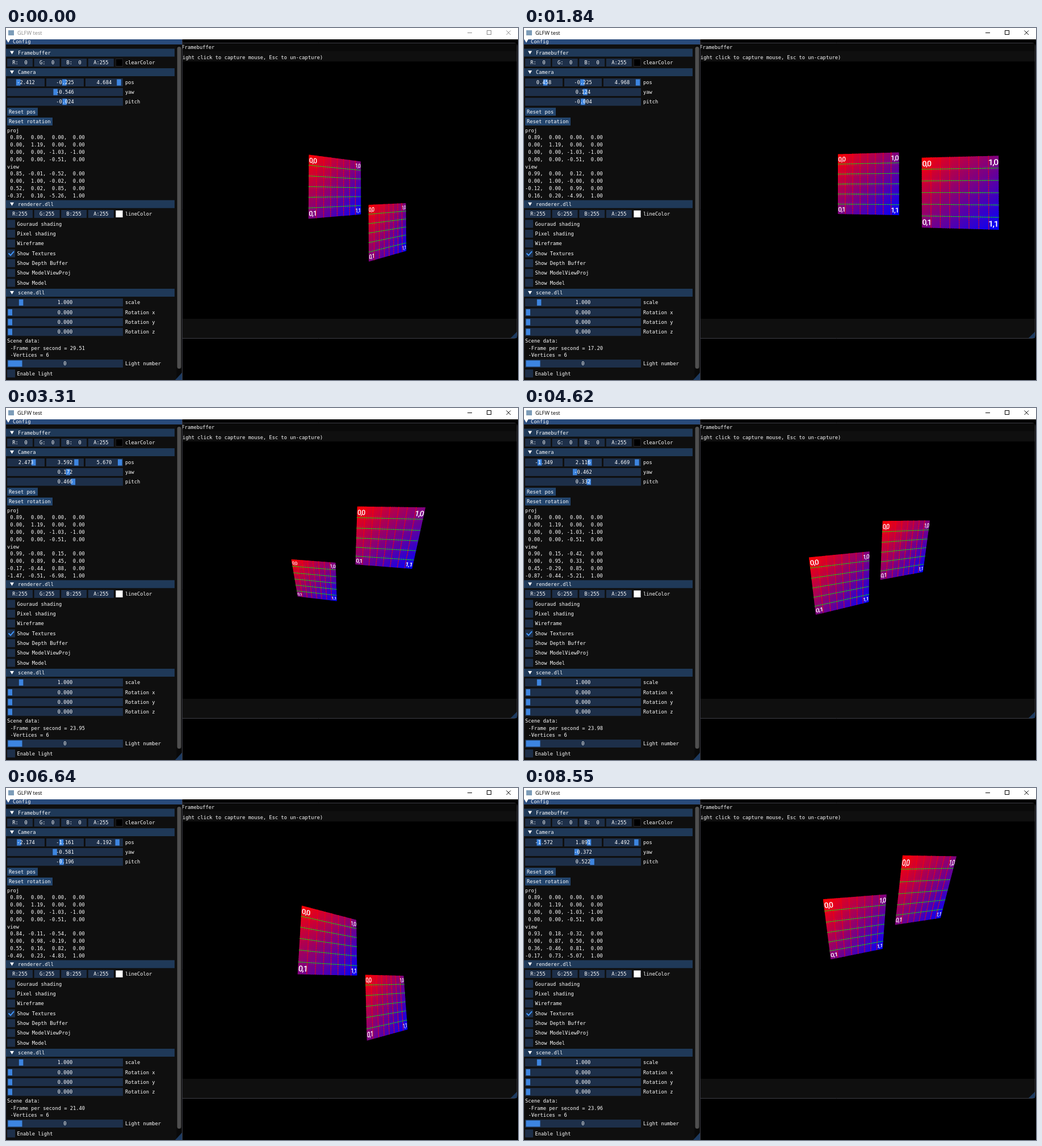
Animation, 902 px wide and 621 px high, one loop 8630 ms. Source, as an HTML page with a canvas:

```html
<!DOCTYPE html>
<html>
<head>
<meta charset="utf-8">
<style>
html, body { margin: 0; width: 100%; height: 100%; overflow: hidden; background: #000; }
canvas { display: block; }
</style>
</head>
<body>
<canvas id="stage" width="902" height="621"></canvas>
<script>
const ctx = document.getElementById('stage').getContext('2d');
const LOOP = 8630, STEPS = 112, STEP = LOOP / STEPS;
const MONO = '8.74px "DejaVu Sans Mono", monospace';
const C = {
  win: '#0f0f0f', frame: '#1d2f49', header: '#1f3958', button: '#23456d',
  grab: '#3d85e0', title: '#294a7a', border: '#3e3e46'
};

// Camera and second quad, keyed by step number.
const KEYS = [0, 24, 43, 60, 75, 97, 108, 111];
const tracks = {
  x: [-2.412, .458, 2.473, -1.349, -2.174, -2.174, -2.1, -1.572],
  y: [-.225, -.225, 3.592, 2.116, -1.387, -.632, .9, 1.891],
  z: [4.684, 4.968, 5.67, 4.669, 4.192, 4.192, 4.25, 4.492],
  yaw: [-.546, .124, .172, -.462, -.574, -.584, -.58, -.372],
  pitch: [-.024, -.0044, .466, .332, -.298, 0, .25, .522],
  lag: [.017, -.004, .012, .036, .026, -.004, -.004, -.005],
  fps: [29.51, 17.2, 23.95, 23.98, 23.45, 19.68, 22.4, 23.96],
  quadX: [2.05, 2.59, 2.89, 2.28, 2.17, 2.18, 2.22, 2.23],
  quadY: [.09, -.43, .04, .05, -.24, -.07, .05, .08],
  quadZ: [.39, .43, .51, .33, .2, .26, .32, .32]
};

// Monotone cubic through the keys.
function sample(v, i) {
  const slope = k => (v[k + 1] - v[k]) / (KEYS[k + 1] - KEYS[k]);
  const tangent = k => {
    if (k === 0 || k === KEYS.length - 1) return slope(k ? k - 1 : 0);
    const a = slope(k - 1), b = slope(k);
    return a * b > 0 ? 2 * a * b / (a + b) : 0;
  };
  let k = 0;
  while (k < KEYS.length - 2 && i >= KEYS[k + 1]) k++;
  const h = KEYS[k + 1] - KEYS[k], s = (i - KEYS[k]) / h, r = 1 - s;
  return v[k] * (1 + 2 * s) * r * r + v[k + 1] * s * s * (3 - 2 * s)
    + h * s * r * (tangent(k) * r - tangent(k + 1) * s);
}

function rect(x, y, w, h, color) {
  ctx.fillStyle = color;
  ctx.fillRect(x, y, w, h);
}

function text(s, x, cy, align = 'left') {
  ctx.font = MONO;
  ctx.textAlign = align;
  ctx.fillStyle = '#fff';
  ctx.fillText(s, x, cy + 3);
}

function path(points, fill, stroke, width = 1) {
  ctx.beginPath();
  points.forEach(p => ctx.lineTo(p[0], p[1]));
  if (fill) { ctx.closePath(); ctx.fillStyle = fill; ctx.fill(); }
  if (stroke) { ctx.strokeStyle = stroke; ctx.lineWidth = width; ctx.stroke(); }
}

function rounded(x, y, w, h, r, fill, stroke) {
  ctx.beginPath();
  ctx.roundRect(x, y, w, h, r);
  if (fill) { ctx.fillStyle = fill; ctx.fill(); }
  if (stroke) { ctx.strokeStyle = stroke; ctx.lineWidth = 1; ctx.stroke(); }
}

const arrow = (x, cy) => path([[x - 3.5, cy - 3], [x + 3.5, cy - 3], [x, cy + 3]], '#fff');

function field(s, x, w, cy) {
  rect(x, cy - 7, w, 14, C.frame);
  text(s, x + w / 2, cy, 'center');
}

function header(s, cy) {
  rect(0, cy - 7, 297, 14, C.header);
  arrow(10.5, cy);
  text(s, 21, cy);
}

function button(s, w, cy) {
  rect(2, cy - 7, w, 14, C.button);
  text(s, 5, cy);
}

function slider(value, lo, hi, x, w, cy, label) {
  const f = Math.min(1, Math.max(0, (value - lo) / (hi - lo)));
  rect(x, cy - 7, w, 14, C.frame);
  rect(x + 1.5 + f * (w - 10.5), cy - 5.5, 7.5, 11, C.grab);
  text(value.toFixed(3), x + w / 2, cy, 'center');
  if (label) text(label, 210, cy);
}

function colorRow(rgb, swatch, label, cy) {
  ['R', 'G', 'B', 'A'].forEach((c, k) =>
    field(c + ':' + String(k < 3 ? rgb : 255).padStart(3), 2 + k * 47.6, 45, cy));
  rect(193, cy - 6.5, 13, 13, C.border);
  rect(193.5, cy - 6, 12, 12, swatch);
  text(label, 210, cy);
}

function matrix(name, rows, cy) {
  text(name, 2, cy);
  rows.forEach((row, k) =>
    text(row.map(n => n.toFixed(2).padStart(5)).join(', '), 2, cy + 12.7 + k * 12.85));
}

function checkbox(s, cy, on) {
  rect(2, cy - 7, 14, 14, C.frame);
  if (on) path([[4.5, cy], [8, cy + 3.5], [14, cy - 3.5]], null, '#4296fa', 2);
  text(s, 19.5, cy);
}

const dot = (a, b) => a[0] * b[0] + a[1] * b[1] + a[2] * b[2];

function viewAxes(yaw, pitch) {
  const c = Math.cos(yaw), s = Math.sin(yaw), cp = Math.cos(pitch), sp = Math.sin(pitch);
  return [[c, 0, -s], [-s * sp, cp, -c * sp], [s * cp, sp, c * cp]];
}

function quad(cx, cy, cz, axes, eye) {
  const project = (u, v) => {
    const p = [cx - 1 + 2 * u - eye[0], cy + 1 - 2 * v - eye[1], cz - eye[2]];
    const [x, y, z] = axes.map(a => dot(a, p));
    return [598 - 269.5 * x / z, 286 + 269.5 * y / z];
  };
  const n = 32, e = .008;
  for (let j = 0; j < n; j++) for (let i = 0; i < n; i++) {
    const u = i / n, v = j / n, u1 = Math.min(1, u + 1 / n + e), v1 = Math.min(1, v + 1 / n + e);
    const mix = (u + v + 1 / n) / 2 * 255;
    path([project(u, v), project(u1, v), project(u1, v1), project(u, v1)],
      `rgb(${255 - mix},0,${mix})`);
  }
  ctx.setLineDash([2, 1.2]);
  for (let k = 1; k < 8; k++) path([project(k / 8, 0), project(k / 8, 1)], null, '#f00', 1.3);
  for (let k = 1; k < 6; k++) path([project(0, k / 6), project(1, k / 6)], null, '#0f0', 1.3);
  ctx.setLineDash([]);

  // Corner labels lie on the surface: 100 units span the quad.
  ctx.font = '500 11px Roboto, sans-serif';
  ctx.letterSpacing = '-1px';
  ctx.fillStyle = '#fff';
  for (const a of [0, 1]) for (const b of [0, 1]) {
    const u = a ? .99 : .005, v = b ? .96 : .125;
    const o = project(u, v), du = project(u + .01, v), dv = project(u, v + .01);
    ctx.save();
    ctx.transform(du[0] - o[0], du[1] - o[1], dv[0] - o[0], dv[1] - o[1], o[0], o[1]);
    ctx.textAlign = a ? 'right' : 'left';
    ctx.fillText(a + ',' + b, 0, 0);
    ctx.restore();
  }
  ctx.letterSpacing = '0px';
}

function titleBar(active) {
  const ink = active ? '#000' : '#8a8a8a';
  rect(0, 0, 902, 20, '#fff');
  rect(4, 4, 10, 9, '#7c9cb8');
  ctx.font = '9.3px "Open Sans", sans-serif';
  ctx.textAlign = 'left';
  ctx.fillStyle = ink;
  ctx.fillText('GLFW test', 20, 12);
  path([[813, 8.5], [821, 8.5]], null, ink);
  ctx.strokeRect(847.5, 4.5, 7, 7);
  path([[881.5, 4.5], [889, 12]], null, ink);
  path([[889, 4.5], [881.5, 12]], null, ink);
}

function framebufferWindow(s, t, eye) {
  rounded(200.5, 26.5, 700, 521, 5, C.win, C.border);
  rect(300, 27, 600, 14, '#0a0a0a');
  text('Framebuffer', 309.5, 34);
  text('(Right click to capture mouse, Esc to un-capture)', 300.5, 52);
  rect(296, 59, 604, 454, '#000');
  path([[900, 536], [900, 547], [889, 547]], '#1d3a60');
  const axes = viewAxes(s.yaw + s.lag, s.pitch);
  quad(0, 0, 0, axes, eye);
  quad(s.quadX, s.quadY + .2 - 2 * Math.cos(t - 6.585), s.quadZ, axes, eye);
}

function configWindow(s, eye) {
  rect(0, 20, 310, 601, C.win);
  rect(0, 20, 310, 9, C.title);
  ctx.save();
  ctx.beginPath();
  ctx.rect(0, 20, 310, 12);
  ctx.clip();
  arrow(4, 23);
  text('Config', 12, 23.5);
  ctx.restore();

  header('Framebuffer', 43.5);
  colorRow(0, '#000', 'clearColor', 61);
  header('Camera', 78);
  eye.forEach((v, k) => slider(v, -5, 5, 2 + k * 69, 66, 96));
  text('pos', 210, 96);
  slider(s.yaw, -Math.PI, Math.PI, 2, 204, 113, 'yaw');
  slider(s.pitch, -Math.PI, Math.PI, 2, 204, 130.2, 'pitch');
  button('Reset pos', 54, 147.7);
  button('Reset rotation', 80, 165);

  matrix('proj', [[.89, 0, 0, 0], [0, 1.19, 0, 0], [0, 0, -1.03, -1], [0, 0, -.51, 0]], 180.7);
  const axes = viewAxes(s.yaw, s.pitch);
  const rows = [0, 1, 2].map(k => [...axes.map(a => a[k]), 0]);
  rows.push([...axes.map(a => -dot(a, eye)), 1]);
  matrix('view', rows, 244.5);

  header('renderer.dll', 310.7);
  colorRow(255, '#fff', 'lineColor', 328);
  ['Gouraud shading', 'Pixel shading', 'Wireframe', 'Show Textures', 'Show Depth Buffer',
    'Show ModelViewProj', 'Show Model']
    .forEach((name, k) => checkbox(name, 345.5 + k * 17.35, k === 3));

  header('scene.dll', 467);
  slider(1, 0, 10, 2, 204, 484.2, 'scale');
  ['x', 'y', 'z'].forEach((axis, k) =>
    slider(0, 0, 360, 2, 204, 501.6 + k * 17.3, 'Rotation ' + axis));
  text('Scene data:', 2, 551.7);
  text('-Frame per second = ' + s.fps.toFixed(2), 7.5, 564.5);
  text('-Vertices = 6', 7.5, 577.3);
  rect(2, 585, 204, 14, C.frame);
  rect(3.5, 586.5, 25, 11, C.grab);
  text('0', 104, 592.2, 'center');
  text('Light number', 210, 592.2);
  checkbox('Enable light', 609.5, false);

  rect(300.5, 31, 9, 590, '#090909');
  rounded(301.5, 33, 7, 568, 3.5, '#4f4f4f');
  path([[310, 608], [310, 621], [298, 621]], '#1d3a60');
  path([[310.5, 20], [310.5, 621]], null, C.border);
}

function draw(step) {
  const s = {};
  for (const name in tracks) s[name] = sample(tracks[name], step);
  const eye = [s.x, s.y, s.z];
  rect(0, 0, 902, 621, '#000');
  framebufferWindow(s, step * STEP / 1000, eye);
  configWindow(s, eye);
  titleBar(step > 0);
}

const start = performance.now();
let last = -1;
function tick() {
  const t = (performance.now() - start) % LOOP;
  // Small lead keeps the steps aligned with 10 ms delays.
  const step = Math.min(STEPS - 1, Math.floor((t + 10) / STEP));
  if (step !== last) draw(last = step);
  requestAnimationFrame(tick);
}
tick();
</script>
</body>
</html>
```
